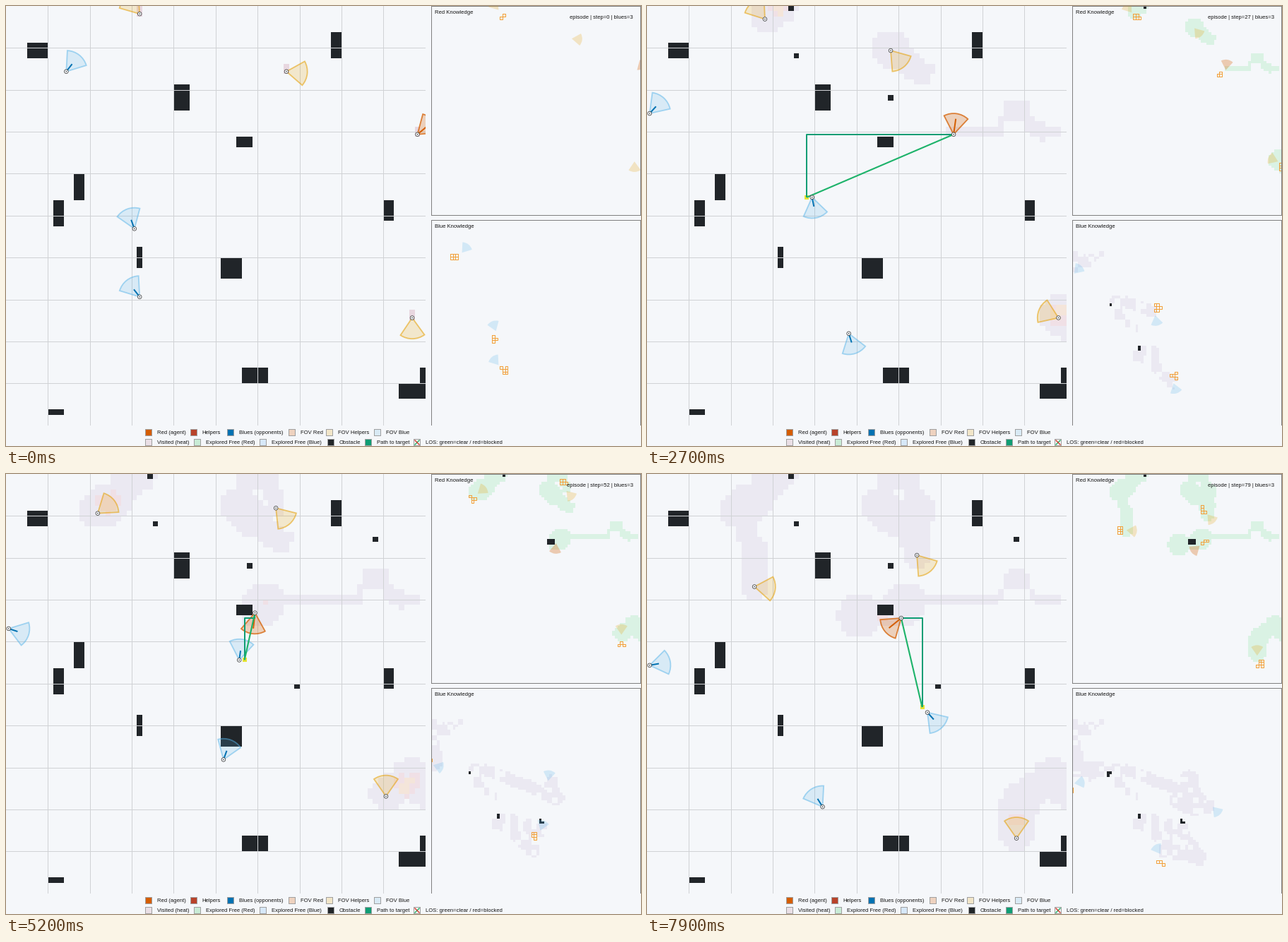
These frames come from a looping animation (899x623 px, 8000 ms). A matplotlib script:

```python
import matplotlib.pyplot as plt
import numpy as np
from matplotlib.animation import FuncAnimation
from matplotlib.colors import to_rgb, to_rgba
from matplotlib.patches import Circle, Rectangle, Wedge

W, H, DPI = 899, 623, 64
PT = 72 / DPI
STEPS, N = 80, 80
CELL, SMALL = 7.42, 3.7
MAIN, TOP, LOW = (0, 0, CELL), (603, 0, SMALL), (603, 303, SMALL)
SIZE = {MAIN: (594, 594), TOP: (295, 296), LOW: (295, 291)}
RED, HELP, BLUE = "#d55e00", "#e69f00", "#56b4e9"
BG, DARK, GRID, FRAME = map(to_rgb, ("#f5f7fa", "#212529", "#d0d2d5", "#808080"))
FRESH, HEAT, PINK, SAND, GREEN = map(to_rgb, ("#e8d7e0", "#ebe9f2", "#f0e0e6", "#f4e5da", "#daf2e4"))
ROW, COL = np.mgrid[:N, :N]

# Steps at which every agent has a known column, row and heading
KEYS = [0, 6, 18, 36, 52, 64, 79]


class Agent:
    """Walks between key poses; a leg marked + or - uses its spare steps for a detour to that side."""

    def __init__(self, kind, poses, bends="000000", narrow=2):
        self.kind, self.narrow = kind, narrow
        col, row, turn = np.array(poses, float).T
        t = np.arange(STEPS)
        path = np.array([np.interp(t, KEYS, col), np.interp(t, KEYS, row)])
        for i, side in enumerate(bends):
            if side == "0":
                continue
            a, b = KEYS[i], KEYS[i + 1]
            dx, dy = col[i + 1] - col[i], row[i + 1] - row[i]
            d = np.hypot(dx, dy)
            amp = 0.5 * np.sqrt(max((b - a) ** 2 - d * d, 0)) * (1 if side == "+" else -1)
            wave = amp * np.sin(np.pi * np.linspace(0, 1, b - a + 1)) / d
            path[:, a:b + 1] += np.array([[-dy], [dx]]) * wave
        self.path = np.rint(path.clip(0, N - 1)).astype(int)
        self.turn = np.interp(t, KEYS, np.unwrap(turn, period=360))
        ahead, behind = np.minimum(t + 3, STEPS - 1), np.maximum(t - 3, 0)
        self.speed = np.hypot(*(path[:, ahead] - path[:, behind])) / (ahead - behind)

    def at(self, t):
        return self.path[0, t], self.path[1, t]

    def view(self, t):
        """Cells explored at step t: slow agents look around further."""
        c, r = self.at(t)
        reach = min(max(4.2 - 3.2 * self.speed[t], self.narrow), 1 + 0.12 * t)
        return np.hypot(COL - c, ROW - r + 0.5) <= reach


red = Agent("red", [(78, 24, -40), (74, 24, 50), (66, 24, 234), (50, 24, -38),
                    (47, 26, 96), (40, 27, 277), (48, 27, 141)], "0+0000", 1)
team = [
    red,
    Agent("help", [(25, 1, 231), (25, 0, 187), (25, 0, 187), (20, 5, 278),
                   (17, 7, -38), (20, 15, 53), (20, 21, 7)]),
    Agent("help", [(53, 12, 6), (52, 13, -82), (47, 9, -39), (44, 6, 140),
                   (51, 6, 49), (50, 9, 7), (51, 15, 51)], "000-00"),
    Agent("help", [(77, 59, 89), (78, 58, 134), (79, 60, 135), (77, 58, 270),
                   (72, 61, 270), (70, 64, 47), (70, 69, 270)])]
prey = Agent("blue", [(24, 42, -110), (18, 37, -104), (22, 32, 49), (40, 39, 109),
                      (44, 35, 278), (39, 43, 77), (53, 45, 48)], "0-++-+")
blues = [
    Agent("blue", [(11, 12, -52), (5, 16, -55), (0, 15, -35), (0, 25, -60),
                   (0, 29, 18), (11, 31, 180), (0, 36, -10)]),
    prey,
    Agent("blue", [(25, 55, 232), (24, 51, 136), (31, 56, 26), (37, 53, 119),
                   (41, 54, 290), (48, 65, 0), (33, 63, 238)], "0-+000")]

# Obstacles: column, row, width, height; then single cells with their first step
WALLS = [(4, 7, 4, 3), (62, 5, 2, 5), (32, 15, 3, 5), (44, 25, 3, 2), (13, 32, 2, 5), (9, 37, 2, 5),
         (25, 46, 1, 4), (41, 48, 4, 4), (72, 37, 2, 4), (45, 69, 5, 3), (79, 69, 1, 3),
         (75, 72, 5, 3), (8, 77, 3, 1)]
built = np.full((N, N), 999)
for c, r, w, h in WALLS:
    built[r:r + h, c:c + w] = 0
for c, r, t in [(27, 0, 2), (28, 9, 3), (46, 17, 5), (70, 12, 41), (55, 40, 47)]:
    built[r, c] = t


def explored(agents):
    """First step at which each cell is seen."""
    born = np.full((N, N), 999)
    for t in reversed(range(STEPS)):
        for a in agents:
            born[a.view(t)] = t
    return born


def visits(agents):
    """Visit heat per step: it adds up and cools down."""
    v, out = np.zeros((N, N)), []
    for t in range(STEPS):
        v = 0.965 * v + sum(a.view(t) for a in agents)
        out.append(v)
    return out


red_born, blue_born, warmth = explored(team), explored(blues), visits(team)
rng = np.random.default_rng(5)
patchy = np.kron(rng.random((N // 2, N // 2)), np.ones((2, 2))) > 0.25

# Background raster
canvas = np.empty((H, W, 3))
canvas[:] = BG


def stamp(view, cells):
    x, y, s = view
    w, h = SIZE[view]
    i = np.minimum(((np.arange(w) + 0.5) / s).astype(int), N - 1)
    j = np.minimum(((np.arange(h) + 0.5) / s).astype(int), N - 1)
    canvas[y:y + h, x:x + w] = cells[np.ix_(j, i)]


def heat_map(t):
    cells = np.full((N, N, 3), BG)
    v, mix = warmth[t], min(t / 6, 1)
    cells[v > 0.13] = np.array(FRESH) * (1 - mix) + np.array(HEAT) * mix
    cells[v > 13] = PINK
    cells[v > 16] = SAND
    cells[built <= t] = DARK
    return cells


def knowledge(born, color, t, mask=True):
    cells = np.full((N, N, 3), BG)
    seen = born < t
    cells[seen & mask] = color
    cells[seen & (built <= t)] = DARK
    return cells


def backdrop(t):
    stamp(MAIN, heat_map(t))
    for k in range(1, 10):
        p = round(k * 8 * CELL)
        canvas[:594, p] = canvas[p, :594] = GRID
    stamp(TOP, knowledge(red_born, GREEN, t))
    stamp(LOW, knowledge(blue_born, HEAT, t, patchy))
    for y0, y1 in ((0, 297), (303, 594)):
        canvas[y0, 602:] = canvas[y0:y1, 602, :] = canvas[y0:y1, 898, :] = FRAME
    canvas[296, 602:] = FRAME
    return canvas


plt.rcParams["font.family"] = "Liberation Sans"
fig = plt.figure(figsize=(W / DPI, H / DPI), dpi=DPI, facecolor=BG)
ax = fig.add_axes([0, 0, 1, 1])
ax.axis("off")


def label(x, y, s, ha="left"):
    return ax.text(x, y, s, ha=ha, va="baseline", fontsize=7.65 * PT, color="#141414", zorder=9)


LEGEND = [
    (599, [(197, "Red (agent)", RED), (261, "Helpers", "#b8432b"), (313, "Blues (opponents)", "#0072b2"),
           (400, "FOV Red", "#eed2bf"), (453, "FOV Helpers", "#f2e6c9"), (521, "FOV Blue", "#d9eaf5")]),
    (613, [(197, "Visited (heat)", "#eadfe6"), (266, "Explored Free (Red)", "#c9ecd6"),
           (359, "Explored Free (Blue)", "#d7e8f8"), (455, "Obstacle", DARK),
           (508, "Path to target", "#0f9d74"), (577, "LOS: green=clear / red=blocked", "#f4f4f4")])]
for y, items in LEGEND:
    for x, text, color in items:
        canvas[y:y + 10, x:x + 10] = to_rgb("#a0a0a0")
        canvas[y + 1:y + 9, x + 1:x + 9] = to_rgb(color)
        label(x + 16.8, y + 7.3, text)
ax.plot([579, 585], [621, 615], color="#1db36a", lw=1.4 * PT, zorder=10)
ax.plot([579, 585], [615, 621], color="#d63a2f", lw=1.4 * PT, zorder=10)
label(607, 11.3, "Red Knowledge")
label(607, 314.3, "Blue Knowledge")
status = label(888, 18, "", "right")
scene = ax.imshow(canvas, extent=(0, W, H, 0), interpolation="nearest", aspect="auto", zorder=0)

# Moving parts
STYLE = {"red": (RED, 0.25, 0.75, RED, 3), "help": (HELP, 0.18, 0.55, None, 0),
         "blue": (BLUE, 0.18, 0.5, "#0072b2", 1.8)}
clips = {v: ax.add_patch(Rectangle(v[:2], *SIZE[v], fill=False, lw=0)) for v in SIZE}


def wedge(view, color, fill, edge=0):
    w = Wedge((0, 0), 4 * view[2], 0, 70, facecolor=to_rgba(color, fill),
              edgecolor=to_rgba(color, edge), linewidth=1.8 * PT if edge else 0, zorder=4)
    ax.add_patch(w).set_clip_path(clips[view])
    return w


def line(view, color, lw, z):
    ln, = ax.plot([], [], color=color, lw=lw * PT, zorder=z, solid_capstyle="butt")
    ln.set_clip_path(clips[view])
    return ln


def disc(r, **style):
    return ax.add_patch(Circle((0, 0), r, **style))


bodies = []
for a in team + blues:
    color, fill, edge, nose, length = STYLE[a.kind]
    view = LOW if a.kind == "blue" else TOP
    fans = [(MAIN, wedge(MAIN, color, fill, edge)), (view, wedge(view, color, fill + 0.04))]
    ray = line(MAIN, nose, 2, 5) if nose else None
    marks = (disc(2.8, facecolor=BG, edgecolor="#444444", linewidth=0.8 * PT, zorder=7),
             disc(0.8, facecolor="#444444", zorder=7.1))
    bodies.append((a, view, fans, ray, length * CELL, marks))

goal = ax.add_patch(Rectangle((0, 0), 6, 6, facecolor="#e8e435", zorder=5))
route = line(MAIN, "#0f9d74", 2, 6)
sight = line(MAIN, "#1db36a", 2.1, 6)
frontier = {v: line(v, "#f2a03a", 1, 5) for v in (TOP, LOW)}

ax.set_xlim(0, W)
ax.set_ylim(H, 0)


def center(view, c, r):
    x, y, s = view
    return x + (c + 0.5) * s, y + (r + 0.5) * s


def cluster(g):
    """A small connected blob of cells, now and then none."""
    if g.random() < 0.3:
        return []
    cells, n = [(0, 0)], g.integers(2, 7)
    while len(cells) < n:
        c, r = cells[g.integers(len(cells))]
        step = g.integers(-1, 2, 2)
        new = (c + step[0], r + step[1])
        if new not in cells and max(map(abs, new)) < 2:
            cells.append(new)
    return cells


def square(x, y, h=SMALL / 2):
    return [(x - h, y - h), (x + h, y - h), (x + h, y + h), (x - h, y + h), (x - h, y - h), (np.nan, np.nan)]


def last_seen(t):
    """The cell the chased agent has just left, behind its heading."""
    c, r = prey.at(t)
    th = np.deg2rad(prey.turn[t])
    return int(c - np.sign(np.sin(th))), int(r - (np.cos(th) > 0.5))


def plan(start, end, solid):
    """Go sideways in the first free row, then straight to the end."""
    (c0, r0), (c1, r1) = start, end
    lo, hi = min(c0, c1), max(c0, c1)
    row = next((r for r in range(r0, r1 + 1) if not solid[r, lo:hi + 1].any()), r0)
    return [start, (c0, row), (c1, row), end]


def blocked(a, b, solid):
    c, r = np.rint(np.linspace(a, b, 160)).astype(int).T
    return solid[r, c].any()


def draw(t):
    scene.set_data(backdrop(t))
    edges = {TOP: [], LOW: []}
    for k, (a, view, fans, ray, length, marks) in enumerate(bodies):
        c, r = a.at(t)
        x, y = center(MAIN, c, r)
        ang = a.turn[t]
        th = np.deg2rad(ang)
        for v, fan in fans:
            fan.set_center(center(v, c, r))
            fan.set_theta1(ang - 35)
            fan.set_theta2(ang + 35)
        if ray:
            ray.set_data([x, x + length * np.cos(th)], [y, y + length * np.sin(th)])
        for m in marks:
            m.center = (x, y)
        g = np.random.default_rng(100 * t + k)
        away = th + np.pi + g.uniform(-0.8, 0.8)
        bc, br = round(c + 3 * np.cos(away)), round(r + 3 * np.sin(away))
        for i, j in cluster(g):
            edges[view] += square(*center(view, bc + i, br + j))
    for view, pts in edges.items():
        frontier[view].set_data(*(np.array(pts).T if pts else ([], [])))

    for art in (goal, route, sight):
        art.set_visible(t > 0)
    if t:
        start, end, solid = red.at(t), last_seen(t), built <= t
        gx, gy = center(MAIN, *end)
        rx, ry = center(MAIN, *start)
        goal.set_xy((gx - 3, gy - 3))
        route.set_data(*zip(*[center(MAIN, *p) for p in plan(start, end, solid)]))
        sight.set_data([rx, gx], [ry, gy])
        sight.set_color("#d63a2f" if blocked(start, end, solid) else "#1db36a")
    status.set_text(f"episode | step={t} | blues=3")
    return []


anim = FuncAnimation(fig, draw, frames=STEPS, interval=100, repeat=True, repeat_delay=0, blit=False)
plt.show()
```
